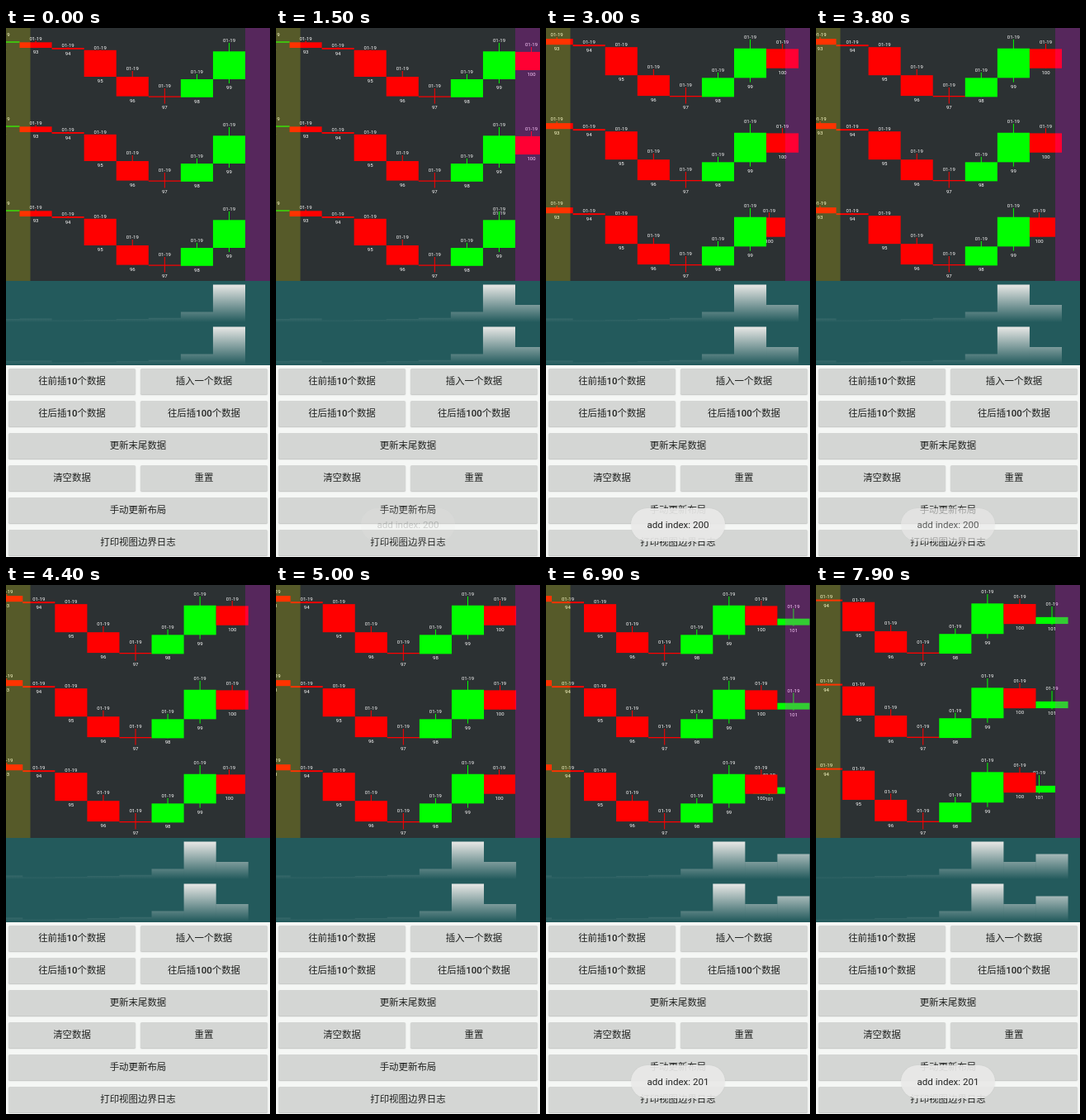
These frames come from a looping animation (320x640 px, 8000 ms). An HTML page with a canvas:

```html
<!DOCTYPE html>
<html lang="zh-CN">
<head>
<meta charset="utf-8">
<title>Candle chart demo</title>
<style>
  html, body { margin: 0; width: 100%; height: 100%; overflow: hidden; background: #f5f7f5; }
  body { position: relative; font-family: Roboto, "Noto Sans CJK SC", "Noto Sans CJK", sans-serif; }
  canvas { position: absolute; left: 0; top: 0; width: 320px; height: 408px; }
  .pad {
    position: absolute; left: 3px; top: 412px; width: 314px;
    display: grid; grid-template-columns: 1fr 1fr; grid-auto-rows: 30.5px; gap: 8.6px 6px;
  }
  .pad div {
    background: #d4d6d4; border-radius: 1.5px; box-shadow: 0 1px 1.5px rgba(0, 0, 0, .22);
    color: #202220; font-weight: 500; font-size: 11.45px; line-height: 31.5px;
    text-align: center; white-space: nowrap;
  }
  .pad .wide { grid-column: span 2; }
  #toast {
    position: absolute; left: 103px; top: 580.5px; width: 114px; height: 40.5px;
    border-radius: 20.25px; background: rgba(233, 234, 232, .91);
    box-shadow: 0 0 2px rgba(0, 0, 0, .06);
    color: #232423; font-size: 11.6px; line-height: 40.5px; text-align: center;
    white-space: nowrap; opacity: 0;
  }
</style>
</head>
<body>
<canvas id="chart" width="320" height="408"></canvas>
<div class="pad">
  <div>往前插10个数据</div><div>插入一个数据</div>
  <div>往后插10个数据</div><div>往后插100个数据</div>
  <div class="wide">更新末尾数据</div>
  <div>清空数据</div><div>重置</div>
  <div class="wide">手动更新布局</div>
  <div class="wide">打印视图边界日志</div>
</div>
<div id="toast"></div>
<script>
const LOOP = 8000, TICK = 100, SLIDE = 4200;
const INSERTS = [1500, 6350];
const FIRST = 92, LAST = 99, EDGE = 290, STEP = 39.07;
const FLOOR = 91.5, SPAN = 80.5;
const RED = '#f00', GREEN = '#0f0';

// body top, body bottom, high, low, colour, volume height
const candles = [
  [16.4, 17.6, 11, 20, GREEN, 4],
  [17.3, 24, 15.3, 24, RED, 4.5],
  [24, 25.8, 23.3, 25.8, RED, 2.5],
  [26.8, 59, 26.6, 59, RED, 3],
  [59, 82.6, 52, 82.6, RED, 4],
  [82.5, 83.7, 73, 91.5, RED, 5.2],
  [62, 83.8, 55.8, 83.8, GREEN, 12.5],
  [28.3, 62, 17.95, 67, GREEN, 45.5],
  [28.9, 51, 23, 51, RED, 21],
  [43.4, 50.9, 31.7, 52, GREEN, 30.5]
].map(([top, bottom, high, low, color, volume], i) =>
  ({ id: FIRST + i, top, bottom, high, low, color, volume }));

const ctx = document.getElementById('chart').getContext('2d');
const toast = document.getElementById('toast');
const clamp = v => Math.min(1, Math.max(0, v));
const decelerate = u => 1 - (1 - u) ** 2;

function fill(color, x, y, w, h) {
  ctx.fillStyle = color;
  ctx.fillRect(x, y, w, h);
}

function drawCandle(c, x, y0, scale) {
  const y = v => y0 + FLOOR - (FLOOR - v) * scale;
  const mid = x + STEP / 2;
  fill(c.color, mid - .5, y(c.high), 1, y(c.low) - y(c.high));
  fill(c.color, x, y(c.top), STEP, y(c.bottom) - y(c.top));
  ctx.fillStyle = '#fff';
  ctx.fillText('01-19', mid, y(c.high) - 2.4);
  ctx.fillText(c.id, mid, y(c.low) + 5.2);
}

function clipped(x, y, w, h, draw) {
  ctx.save();
  ctx.beginPath();
  ctx.rect(x, y, w, h);
  ctx.clip();
  draw();
  ctx.restore();
}

function drawCharts(t) {
  const added = INSERTS.filter(s => t >= s);
  const shift = STEP * added.reduce((sum, s) => sum + decelerate(clamp((t - s) / SLIDE)), 0);
  const newest = LAST + added.length;
  const left = c => EDGE + (c.id - LAST - 1) * STEP - shift;
  const shown = candles.filter(c => c.id <= newest && left(c) + STEP > 0);
  const scale = SPAN / (FLOOR - Math.min(...shown.map(c => c.high)));

  fill('#2c3133', 0, 0, 320, 306);
  ctx.font = '6px Roboto, sans-serif';
  ctx.textAlign = 'center';
  ctx.textBaseline = 'middle';

  for (let row = 0; row < 3; row++) {
    const y0 = row * 102;
    clipped(0, y0, 320, 102, () => {
      // The last row keeps its newest candle in place, beneath the others.
      const pinned = row === 2 && added.length;
      if (pinned) drawCandle(shown[shown.length - 1], EDGE - STEP, y0, scale);
      for (const c of shown) {
        if (!(pinned && c.id === newest)) drawCandle(c, left(c), y0, scale);
      }
    });
  }
  fill('rgba(255,255,0,.2)', 0, 0, 29.5, 306);
  fill('rgba(255,0,255,.2)', EDGE, 0, 30, 306);

  fill('#235a5c', 0, 306, 320, 102);
  for (const base of [356, 407]) {
    const fade = ctx.createLinearGradient(0, base - 45.5, 0, base);
    fade.addColorStop(0, 'rgba(232,232,230,1)');
    fade.addColorStop(1, 'rgba(232,232,230,0)');
    for (const c of shown) fill(fade, left(c), base - c.volume, STEP, c.volume);
  }
}

function drawToast(t) {
  const n = t >= INSERTS[1] ? 1 : 0;
  const age = t - INSERTS[n];
  const enter = decelerate(clamp((age + 50) / 500));
  const leave = clamp((age - 2030) / 500) ** 2;
  toast.textContent = 'add index: ' + (200 + n);
  toast.style.opacity = age < 0 ? 0 : enter * (1 - leave);
}

function frame() {
  const t = Math.floor(performance.now() % LOOP / TICK) * TICK;
  drawCharts(t);
  drawToast(t);
  requestAnimationFrame(frame);
}
frame();
</script>
</body>
</html>
```
